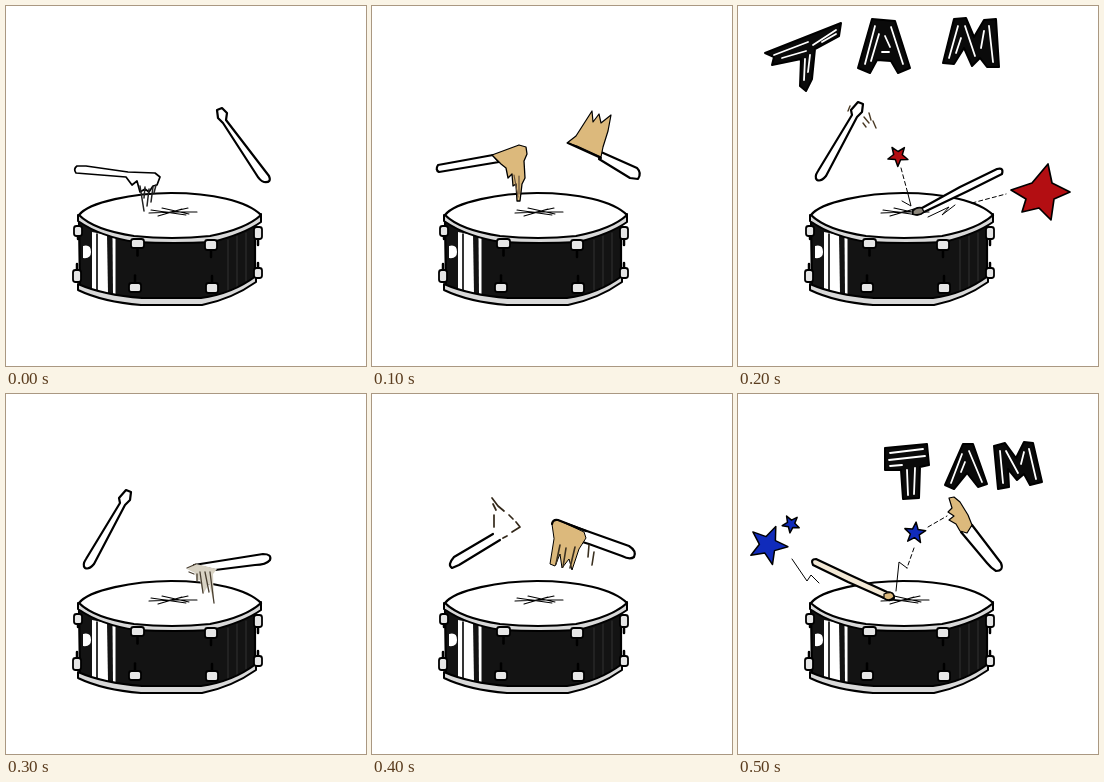
An HTML page that plays this animation: 360x360 px, repeating every 600 ms.

```html
<!DOCTYPE html>
<html lang="en">
<head>
<meta charset="utf-8">
<title>Snare drum</title>
<style>
html, body { margin: 0; width: 100%; height: 100%; overflow: hidden; background: #fff; }
svg { display: block; width: 100vw; height: 100vh; }
path { stroke-linejoin: round; stroke-linecap: round; }
</style>
</head>
<body>
<svg id="stage" viewBox="0 0 360 360"></svg>
<script>
const TAN = '#dcb97c', RED = '#b30e12', BLUE = '#102bbb', GREY = '#d9d9d9';
const STEP = 100;

const shape = (d, fill = '#fff', width = 2.2, stroke = '#000') =>
  `<path d="${d}" fill="${fill}" stroke="${stroke}" stroke-width="${width}"/>`;
const line = (d, width = 1, color = '#000') => shape(d, 'none', width, color);
const dashed = d => `<path d="${d}" fill="none" stroke="#000" stroke-width="1" stroke-dasharray="4 3"/>`;

function star(x, y, r, turn, fill) {
  const points = Array.from({ length: 10 }, (_, i) => {
    const a = turn + i * Math.PI / 5, q = i % 2 ? r * 0.43 : r;
    return `${(x + q * Math.sin(a)).toFixed(1)},${(y - q * Math.cos(a)).toFixed(1)}`;
  });
  return shape(`M${points.join(' ')}Z`, fill, 1.5);
}

// Black brush letter with light gaps between the strokes
const letter = (d, gaps) => shape(d, '#0a0a0a', 2) + line(gaps, 1.8, '#fff');

const lug = (x, y, w, h, stem) =>
  line(`M${x + w / 2},${y + h / 2} v${stem}`, 2.5) +
  `<rect x="${x}" y="${y}" width="${w}" height="${h}" rx="2.5" fill="#e6e6e6" stroke="#000" stroke-width="1.8"/>`;

const drum =
  shape('M73,214 L74,281 Q100,293 135,296 H196 Q228,291 249,274 V214Z', '#131313') +
  shape('M86,226 L101,229 L102,287 L86,283Z', '#fff', 0) +
  shape('M106.5,231 L109.5,231 V288 L107,288Z', '#fff', 0) +
  line('M91,228 V285', 1.6) +
  line('M222,234 V286 M231,230 V281 M240,227 V275', 1, '#333') +
  shape('M77,240 Q85,238 85,246 Q85,253 77,252Z', '#fff', 0) +
  shape('M72,278 Q97,289 136,292 H195 Q226,288 250,270 L250,276 Q226,293 196,299 H135 Q97,296 72,284Z', GREY, 2) +
  shape('M72,209 L72,215 Q95,231 130,236 Q168,238 206,236 Q238,228 255,216 V208Z', GREY, 2) +
  shape('M73,209 C83,196 128,187 165,187 C206,187 241,195 255,209 Q240,223 204,230 Q166,234 128,230 Q88,224 73,209Z') +
  lug(68, 220, 8, 10, 8) + lug(125, 233, 13, 9, 12) + lug(199, 234, 12, 10, 12) + lug(248, 221, 8, 12, 12) +
  lug(67, 264, 8, 12, -12) + lug(123, 277, 12, 9, -12) + lug(200, 277, 12, 10, -12) + lug(248, 262, 8, 10, -10) +
  line('M143,207 L169,206 L191,206 M145,204 L180,209 M152,210 L176,203 M156,202 L183,208 M160,207 L182,202', 1.1);

const raisedLeft = shape('M120,96 L125,98 L124,106 L119,111 L88,170 Q83,176 79,174 Q76,171 80,165 L114,109 L113,104Z');

const poses = [
  shape('M71,160 Q67,163 70,167 L120,171 L126,179 L131,175 L134,186 L139,183 L143,186 L147,180 L151,179 L154,171 L149,167 L122,166 L80,160Z', '#fff', 1.7) +
  line('M134,180 L138,205 M139,181 L138,192 M143,183 L141,200 M147,181 L145,196 M150,179 L148,187', 1.5, '#222') +
  shape('M211,104 L216,102 L221,107 L220,114 L263,170 Q266,177 258,176 Q254,175 250,168 L217,117 L212,112Z'),

  shape('M66,159 Q63,164 67,166 L127,156 L121,149Z') +
  shape('M120,149 L147,139 L154,141 L155,148 L152,155 L153,172 L150,178 L148,195 L145,195 L144,178 L141,180 L140,168 L136,172 L134,162 L129,158Z', TAN, 1.3) +
  line('M142,169 L146,191 M147,170 V188', 1.2, '#65503a') +
  shape('M229,146 L265,162 Q270,167 266,173 L258,172 L227,153Z') +
  shape('M195,137 L204,130 L220,105 L221,116 L227,108 L229,117 L239,109 L236,125 L231,141 L229,151 L205,140Z', TAN, 1.2) +
  line('M196,137 L229,152', 2),

  letter('M27,47 L103,17 L101,30 L77,43 L74,73 L68,85 L62,80 L63,53 L34,59 L36,51Z',
    'M36,49 L70,36 M44,52 L68,45 M75,39 L98,24 M84,36 L98,28 M67,53 L66,74 M72,49 L70,66') +
  letter('M134,13 L157,15 L172,62 L160,67 L153,55 L139,54 L132,67 L120,62Z',
    'M137,20 L127,58 M141,28 L133,55 M147,30 L152,41 M153,21 L165,58 M144,46 H151') +
  letter('M216,13 L228,12 L236,31 L246,14 L258,13 L261,61 L249,61 L242,52 L234,60 L226,42 L216,58 L205,57Z',
    'M220,20 L211,52 M227,20 L237,50 M251,20 L255,56 M246,25 L243,42 M223,32 L218,47') +
  raisedLeft +
  line('M126,111 L131,117 M131,107 L133,114 M135,115 L138,122 M125,117 L128,121 M112,100 L110,105', 1.4, '#4a3a24') +
  shape('M175,205 Q178,201 184,202 L222,181 L259,163 Q266,161 264,168 L230,185 L186,206 Q181,210 175,208Z') +
  shape('M175,205 Q178,201 184,202 L186,206 Q181,210 175,208Z', '#8d877c', 1.3) +
  star(160, 150, 10.5, 0.65, RED) +
  shape('M310,158 L314,177 L332,186 L316,193 L313,214 L301,202 L284,206 L288,193 L273,184 L294,177Z', RED, 1.7) +
  dashed('M163,162 L170,188 M234,197 L268,188') +
  line('M170,188 L173,200 L164,195 M190,211 L211,201 L204,209 L217,199'),

  raisedLeft +
  shape('M188,171 L257,160 Q266,160 264,166 Q260,171 249,171 L209,176Z') +
  shape('M181,175 L190,170 L211,175 L207,180 L208,209 L203,190 L197,200 L194,186 L191,187 L189,179Z', '#d8d2c3', 0) +
  line('M181,174 L190,170 M183,178 L188,180 M191,180 V187 M194,178 L197,199 M199,178 L203,198 M204,178 L208,209', 1.3, '#493f31'),

  line('M121,140 L82,163 Q75,171 80,174 L87,171 L128,146', 2.2) +
  line('M120,104 L126,112 L132,117 M121,110 L124,116 M122,121 V133 M137,121 L141,125 M144,128 L148,133 L140,138 M135,142 L131,144', 1.7, '#33281a') +
  shape('M184,126 L257,152 Q265,157 262,163 Q258,166 250,162 L217,150 L207,147Z') +
  shape('M180,129 Q181,125 186,126 L212,138 L214,144 L207,155 L200,176 L197,165 L190,174 L188,160 L183,172 L178,170 L182,145Z', TAN, 1) +
  line('M180,130 Q181,125 186,126 L214,137', 2.2) +
  line('M188,151 L184,170 M194,154 L191,173 M203,153 L198,174 M217,151 L216,163 M222,158 L220,171', 1.6, '#3b301f'),

  letter('M147,54 L189,50 L191,71 L182,73 L181,104 L165,105 L163,76 L147,76Z',
    'M152,59 L185,55 M151,66 L187,62 M152,72 L164,71 M169,76 L170,101 M177,74 L176,100') +
  letter('M225,50 L235,50 L249,90 L240,93 L229,79 L216,95 L207,91Z',
    'M224,60 L213,89 M231,57 L244,88 M227,68 L223,78') +
  letter('M256,52 L267,49 L278,64 L286,48 L295,49 L304,88 L292,91 L286,80 L279,86 L270,75 L271,93 L260,95Z',
    'M262,57 L265,89 M268,57 L280,79 M291,55 L298,85 M286,58 L283,70') +
  shape('M223,138 L234,131 L263,169 Q266,177 258,177 Q253,174 249,169Z') +
  shape('M211,104 L216,103 L222,108 L230,121 L234,131 L229,139 L222,137 L218,130 L211,126 L216,122 L210,118 L214,114Z', TAN, 1.2) +
  shape('M78,165 Q72,165 75,171 L110,188 L146,204 Q152,208 156,204 Q156,198 149,198 L112,181Z', '#f3e9d6') +
  shape('M146,200 Q155,196 156,203 Q151,208 146,204Z', TAN, 1.2) +
  star(30, 151, 20, 0.4, BLUE) + star(53, 130, 9, 0.75, BLUE) + star(177, 139, 11, 0.1, BLUE) +
  line('M54,165 L69,187 L73,181 L81,189 M169,174 L161,168 L158,197') +
  dashed('M176,154 L169,174 M190,133 L209,122')
];

const stage = document.getElementById('stage');
stage.innerHTML = drum + poses.map(p => `<g display="none">${p}</g>`).join('');
const groups = stage.querySelectorAll('g');

function draw() {
  const now = Math.floor(performance.now() / STEP) % poses.length;
  groups.forEach((g, i) => g.setAttribute('display', i === now ? 'inline' : 'none'));
  requestAnimationFrame(draw);
}
draw();
</script>
</body>
</html>
```
